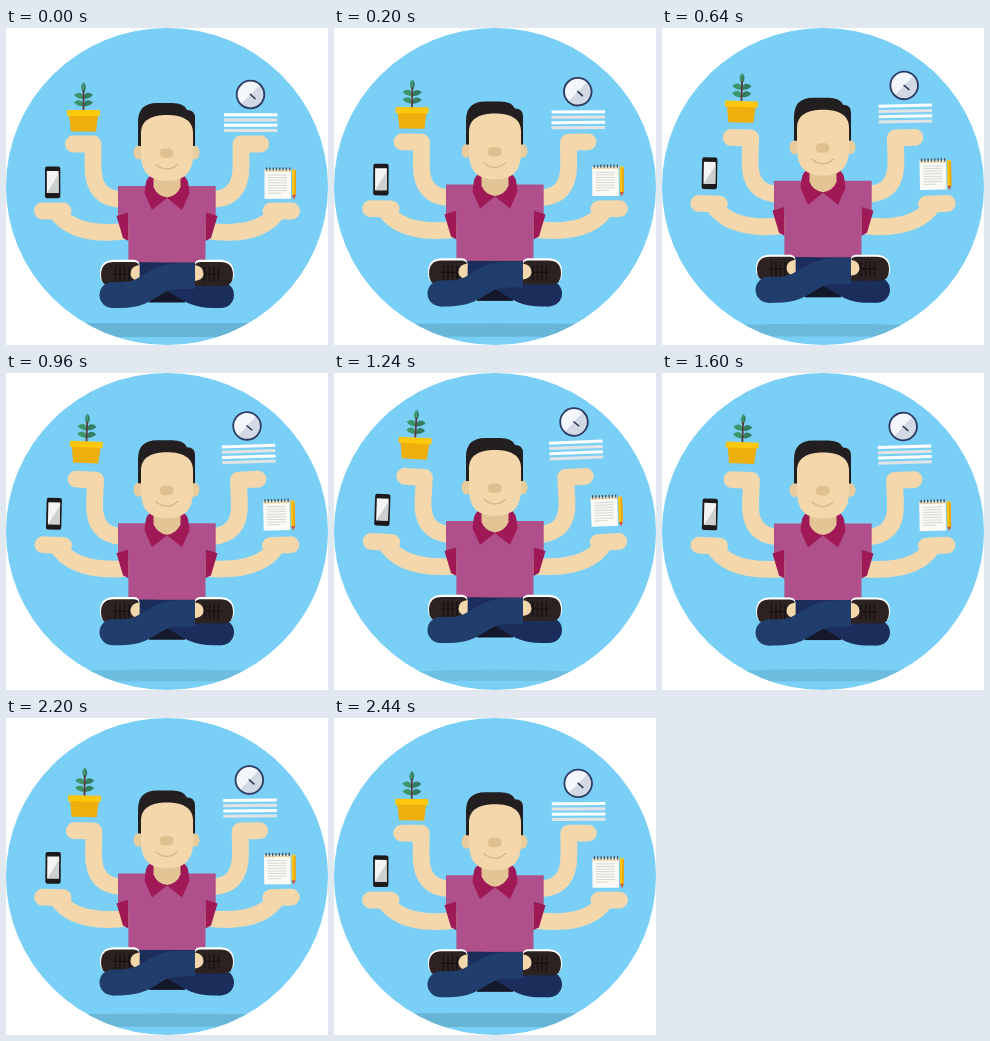
These frames come from a looping animation (322x317 px, 2520 ms). An HTML page:

```html
<!DOCTYPE html>
<html lang="en">
<head>
<meta charset="utf-8">
<title>Floating multitasker</title>
<style>
  html, body { margin: 0; width: 100%; height: 100%; overflow: hidden; background: #fff; }
  svg { display: block; width: 100%; height: 100%; }
</style>
</head>
<body>
<svg viewBox="0 0 322 317">
  <defs>
    <clipPath id="disc"><ellipse cx="161" cy="158.5" rx="161" ry="158.5"/></clipPath>
    <g id="shoe">
      <path d="M94 247Q93.500 231.800 108 231.800H128Q133.500 232 133.500 238V257H104Q94 257 94 247Z" fill="#fff"/>
      <path d="M95 247Q95 234 108 234H128Q133.500 234 133.500 240V258H104Q95 258 95 247Z" fill="#2c2221"/>
      <path d="M109.500 239V254M114 239V254M118.500 239V254M123 239V254M107 246H124" stroke="#15100f" stroke-width="1.200"/>
      <path d="M133.500 237Q124.500 238 124.500 246Q125 252 133.500 253Z" fill="#f4d8ab"/>
    </g>
    <path id="leaf" d="M0 0C-3 1 -7 -.5 -9.500 -3.500C-5 -7.500 -1 -6 0 -1Z"/>
    <g id="leaves">
      <use href="#leaf" x="77.500" y="70.500"/>
      <use href="#leaf" x="77.500" y="78"/>
    </g>
  </defs>

  <g clip-path="url(#disc)">
    <rect width="322" height="317" fill="#7acff6"/>
    <path id="shadow" fill="#4a8fa8"/>
  </g>

  <g id="body">
    <g fill="none" stroke="#f4d8ab" stroke-width="16.800" stroke-linecap="round" stroke-linejoin="round">
      <g id="armsLeft">
        <path data-pivot="115 172" d="M67.400 116H87V138C87 162 98 171 117 171.500"/>
        <path data-pivot="115 195" d="M36.400 183H57M50 183C60 198 80 208 120 203"/>
      </g>
      <g id="armsRight" transform="matrix(-1 0 0 1 322 0)"></g>
    </g>

    <path d="M112 158H209.700V188L199.500 184V238H122.400V184L112 188Z" fill="#b0508a"/>
    <path d="M110.500 188L122.400 184V213L117 210ZM211.500 188L199.500 184V213L205 210Z" fill="#9e1955"/>
    <path d="M147 146.500Q140 149 139.500 157L138.500 165L146 182L161 170L176 182L183.500 165L182.500 157Q182 149 175 146.500Z" fill="#9e1955"/>
    <path d="M147.500 146H174.500V159Q171 168 161 169.500Q151 168 147.500 159Z" fill="#e3c595"/>

    <ellipse cx="132.500" cy="124.500" rx="5" ry="7" fill="#e9cc9c"/>
    <ellipse cx="188.500" cy="124.500" rx="5" ry="7" fill="#e9cc9c"/>
    <path d="M132 118V94Q132 75 151 75H166Q178 75 181 82Q189 82 189 90V118Z" fill="#231f20"/>
    <path d="M135 105C135 92 146 87 161 87S187 92 187 105V127Q187 153 161 153Q135 153 135 127Z" fill="#f4d8ab"/>
    <rect x="153.500" y="120.500" width="14" height="9.500" rx="4.500" fill="#dfc08f"/>
    <path d="M149.500 136Q161 146 172 136" fill="none" stroke="#d8b785" stroke-width="1.300"/>

    <rect x="143" y="254" width="36" height="20.500" fill="#15182a"/>
    <g fill="none" stroke-width="26">
      <rect x="133" y="234.500" width="56" height="20" fill="#1b2d5b" stroke="none"/>
      <path d="M133 247.500H147C177 247.500 177 267 207 267H215" stroke="#1b2d5b"/>
      <circle cx="215" cy="267" r="13" fill="#1b2d5b" stroke="none"/>
      <use href="#shoe" stroke-width="1"/>
      <use href="#shoe" stroke-width="1" transform="matrix(-1 0 0 1 322 0)"/>
      <path d="M106 267H115C145 267 145 248 175 248H189" stroke="#213d6b"/>
      <circle cx="106.500" cy="267" r="13" fill="#213d6b" stroke="none"/>
    </g>
  </g>

  <g class="item" data-dx="3.300" data-tilt="3" data-pivot="77.500 92">
    <g fill="#3d9568">
      <use href="#leaves"/>
      <path d="M77.500 54Q72.500 59 77.500 65Z"/>
    </g>
    <g fill="#347d60">
      <use href="#leaves" transform="matrix(-1 0 0 1 155 0)"/>
      <path d="M77.500 54Q82.500 59 77.500 65Z"/>
    </g>
    <path d="M77.500 62V83" stroke="#5c3a3c" stroke-width="1.800"/>
    <path d="M63 87H92L90 103.500H65Z" fill="#eeae0b"/>
    <rect x="61" y="82" width="33" height="6" rx="1" fill="#fdc70e"/>
  </g>

  <g class="item" data-dx="1.700" data-tilt="2" data-pivot="46.500 154">
    <rect x="39" y="138.500" width="15.300" height="31.700" rx="2" fill="#1c1a1d"/>
    <rect x="40.800" y="143" width="11.800" height="22" fill="#f4f4f3"/>
    <path d="M52.600 146V165H41Z" fill="#cdd0d0"/>
  </g>

  <g class="item" data-dx="-4.500" data-tilt="-3" data-pivot="244.500 66.500">
    <circle cx="244.500" cy="66.500" r="13.800" fill="#f3f6fa"/>
    <path d="M254.300 56.700A13.800 13.800 0 0 1 234.700 76.300Z" fill="#d2d9e5"/>
    <circle cx="244.500" cy="66.500" r="13.800" fill="none" stroke="#2c3b63" stroke-width="1.800"/>
    <path d="M244 66L249.500 71" stroke="#26304f" stroke-width="1.500"/>
  </g>

  <g class="item" data-dx="-2.700" data-tilt="-2.300" data-pivot="244.500 94">
    <path d="M218 86.700H271.500M218 97.300H271.500" stroke="#fff" stroke-width="3"/>
    <path d="M218 92H271.500M218 102.500H271.500" stroke="#e2e4e4" stroke-width="3"/>
  </g>

  <g class="item" data-dx="-1.500" data-tilt="-2" data-pivot="273 155">
    <rect x="258.500" y="141.500" width="26.500" height="29.300" fill="#fbfaf5"/>
    <path d="M258.500 143H285" stroke="#ead2a4" stroke-width="1.500"/>
    <path d="M260 141H285" stroke="#4a4644" stroke-width="3.200" stroke-dasharray="1.200 2.100"/>
    <path d="M262 147H281M262 149.600H281M262 152.200H281M262 154.800H281M262 157.400H281M262 160H281M262 162.600H281M262 165.200H275" stroke="#d2d2cf" stroke-width=".9"/>
    <rect x="286" y="141.500" width="4" height="26" rx="1" fill="#fcc310"/>
    <path d="M288.500 143H290V167H288.500Z" fill="#e8a012"/>
    <path d="M286 167H290L288 171.500Z" fill="#c9543f"/>
  </g>
</svg>
<script>
  const STEP = 40, STEPS = 63, HALF = 31;
  const BODY_RISE = 10, ITEM_RISE = 17.5, ARM_TILT = 3.4;
  const byId = id => document.getElementById(id);
  const move = (el, value) => el.setAttribute('transform', value);

  byId('armsRight').innerHTML = byId('armsLeft').innerHTML;
  const body = byId('body'), shadow = byId('shadow');
  const arms = document.querySelectorAll('#body path[data-pivot]');
  const items = document.querySelectorAll('.item');

  // Linear rise and fall in 40 ms steps, with a short hold at each end
  function lift(time) {
    const step = Math.min(Math.floor(time / STEP) % STEPS, STEPS - 2);
    return Math.min(step, STEPS - step) / HALF;
  }

  function draw(time) {
    const p = lift(time);
    move(body, `translate(0 ${-BODY_RISE * p})`);
    for (const arm of arms) move(arm, `rotate(${ARM_TILT * p} ${arm.dataset.pivot})`);
    for (const item of items) {
      const { dx, tilt, pivot } = item.dataset;
      move(item, `translate(${dx * p} ${-ITEM_RISE * p}) rotate(${tilt * p} ${pivot})`);
    }
    // The shadow fades and its upper edge bends as the body rises
    const edge = 295 + 4 * p;
    shadow.setAttribute('d', `M70 ${edge}Q161 ${295 - p} 252 ${edge}V${309 - p}H70Z`);
    shadow.setAttribute('opacity', 0.42 - 0.16 * p);
  }

  const start = performance.now();
  function tick() {
    draw(performance.now() - start);
    requestAnimationFrame(tick);
  }
  tick();
</script>
</body>
</html>
```
